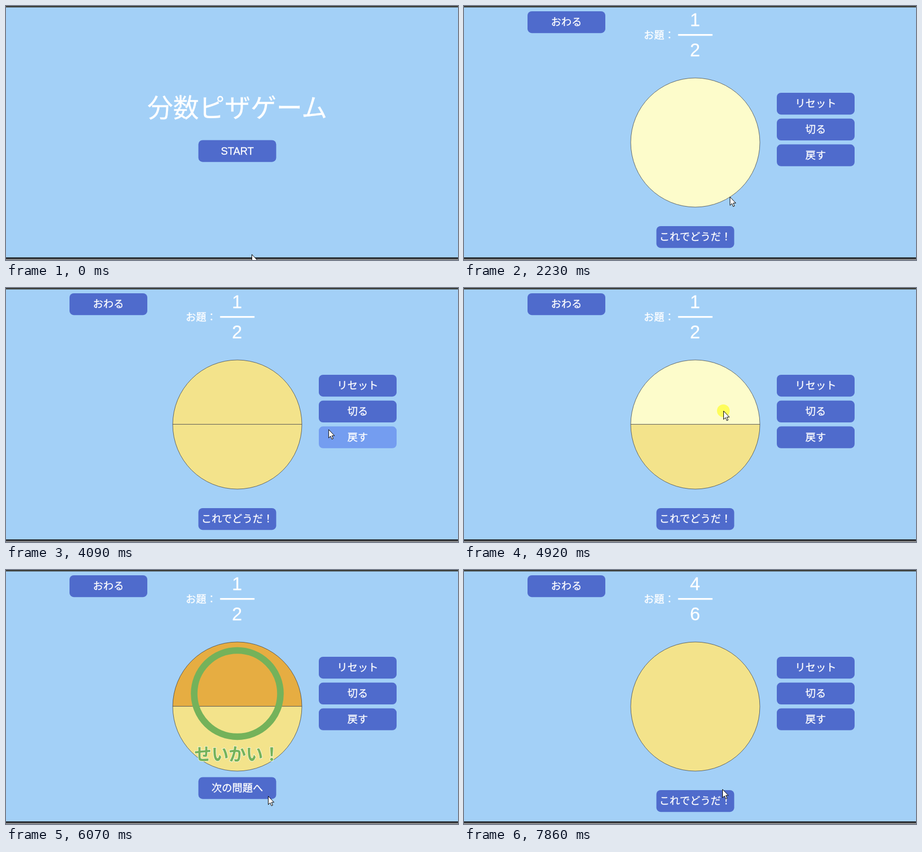
Write an HTML page that moves like this. It is 854 px wide and 480 px high and loops after 8000 ms.

```html
<!DOCTYPE html>
<html lang="ja">
<head>
<meta charset="utf-8">
<title>分数ピザゲーム</title>
<style>
html, body { margin: 0; width: 100%; height: 100%; overflow: hidden; background: #a3d0f7; }
svg { display: block; width: 854px; height: 480px; }
text { font-family: "Noto Sans CJK JP", "Noto Sans CJK", sans-serif; fill: #fff; stroke: #fff; stroke-width: .3px; text-anchor: middle; font-size: 19.5px; }
.latin { font-family: "Liberation Sans", Arial, sans-serif; }
.big { font-size: 48.8px; }
.num { font-size: 34.2px; }
.praise { font-size: 32.5px; font-weight: 700; fill: #74b25a; stroke: #f4f7dc; stroke-width: 2px; paint-order: stroke; }
</style>
</head>
<body>
<svg viewBox="0 0 854 480">
  <rect width="854" height="480" fill="#a3d0f7"/>
  <text id="title" class="big" x="437" y="210">分数ピザゲーム</text>
  <g id="game">
    <text x="368.8" y="61.5">お題：</text>
    <text id="top" class="latin num" x="436.5" y="38.3"></text>
    <rect x="404.5" y="53" width="65" height="3.3" fill="#fff"/>
    <text id="bottom" class="latin num" x="436.5" y="95.2"></text>
    <path id="upper" d="M315 258A122 122 0 0 1 559 258Z"/>
    <path id="lower" d="M315 258A122 122 0 0 0 559 258Z"/>
    <path id="seam" d="M315 257.6H559" stroke="#555"/>
    <circle cx="437" cy="258" r="122" fill="none" stroke="#333" stroke-width=".7"/>
  </g>
  <g id="result">
    <circle cx="437" cy="233.5" r="81.5" fill="none" stroke="#74b25a" stroke-width="12.5"/>
    <text class="praise" x="437" y="360">せいかい！</text>
  </g>
  <g id="buttons"></g>
  <rect width="854" height="2.6" fill="#3b3d38"/>
  <rect y="475" width="854" height="3" fill="#25292d"/>
  <rect y="478" width="854" height="2" fill="#8b8b8b"/>
  <g id="mouse">
    <circle id="press" r="12" fill="#fefd5c"/>
    <path d="M.5 .5V16.3L4.1 12.9L6.5 18.6L9 17.5L6.6 12H11.4Z" fill="#fff" stroke="#000"/>
  </g>
</svg>
<script>
const LOOP = 8000, LAG = 75, PRESS = 70;
const PLAY = 1710, CUT = 3700, PICK = 4990, RIGHT = 6010, NEXT = 7730;
const BASE = '#f3e38b', HOVER = '#fdfccb', PICKED = '#e6ad42';
const CX = 437, CY = 258, R = 122, W = 147, H = 41.2, STEP = 48.8;
const el = id => document.getElementById(id);
const lerp = (a, b, u) => a + (b - a) * u;

// each move curves toward `bend` and slows down by the power `ease`
const moves = [
  { from: 60, to: 1020, end: [440, 284], bend: [452, 350], ease: 2 },
  { from: 2090, to: 2900, end: [660, 302], bend: [532, 456], ease: 2 },
  { from: 2900, to: 3350, end: [658, 241], bend: [659, 271], ease: 2 },
  { from: 3700, to: 4780, end: [490, 232], bend: [600, 300], ease: 1 },
  { from: 5140, to: 5800, end: [495, 427], bend: [510, 330], ease: 2 },
  { from: 7210, to: 7860, end: [488, 414], bend: [492, 421], ease: 1 }
];
const clicks = [1420, 3490, 4920, 5870, 7340];

function pointer(t) {
  let p = [464, 469];
  for (const { from, to, end, bend, ease } of moves) {
    if (t < from) break;
    const u = 1 - (1 - Math.min(1, (t - from) / (to - from))) ** ease;
    p = p.map((v, i) => lerp(lerp(v, bend[i], u), lerp(bend[i], end[i], u), u));
  }
  return p;
}

const playing = t => t >= PLAY;
const showing = t => t >= RIGHT && t < NEXT;
const asking = t => playing(t) && !showing(t);

function add(tag, parent, attrs) {
  const node = document.createElementNS('http://www.w3.org/2000/svg', tag);
  for (const k in attrs) node.setAttribute(k, attrs[k]);
  return parent.appendChild(node);
}

function button(label, x, y, on, font = '') {
  const g = add('g', el('buttons'));
  const box = add('rect', g, { x, y, width: W, height: H, rx: 8 });
  add('text', g, { x: x + W / 2, y: y + 27.4, class: font }).textContent = label;
  return { g, box, x, y, on };
}

const mid = CX - W / 2;
const buttons = [
  button('START', mid, 253.5, t => !playing(t), 'latin'),
  button('おわる', 120, 10, playing),
  ...['リセット', '切る', '戻す'].map((s, i) => button(s, 591, 164 + i * STEP, playing)),
  button('これでどうだ！', mid, 416, asking),
  button('次の問題へ', mid, 391.5, showing)
];

function show(node, on) { node.style.display = on ? '' : 'none'; }

function draw(t) {
  const [x, y] = pointer(t);
  const [hx, hy] = pointer(t - LAG);
  // a new screen reacts only once the pointer moves
  const live = t < PLAY || (t >= 1900 && t < RIGHT) || (t >= 7270 && t < NEXT);

  for (const b of buttons) {
    const over = live && hx >= b.x && hx <= b.x + W && hy >= b.y && hy <= b.y + H;
    show(b.g, b.on(t));
    b.box.setAttribute('fill', over ? '#749df0' : '#4f6bcc');
  }

  const cut = t >= CUT && t < NEXT;
  const picked = t >= PICK && t < NEXT;
  const onPizza = live && !showing(t) && Math.hypot(hx - CX, hy - CY) < R;
  const tint = inHalf => onPizza && (!cut || inHalf) ? HOVER : BASE;
  el('upper').setAttribute('fill', picked ? PICKED : tint(hy < CY));
  el('lower').setAttribute('fill', tint(hy >= CY));
  show(el('seam'), cut);
  show(el('title'), !playing(t));
  show(el('game'), playing(t));
  show(el('result'), showing(t));
  el('top').textContent = t < NEXT ? 1 : 4;
  el('bottom').textContent = t < NEXT ? 2 : 6;

  el('mouse').setAttribute('transform', `translate(${x} ${y})`);
  show(el('press'), clicks.some(c => t >= c && t < c + PRESS));
}

const start = performance.now();
function tick(now) {
  draw(Math.max(0, now - start) % LOOP);
  requestAnimationFrame(tick);
}
draw(0);
requestAnimationFrame(tick);
</script>
</body>
</html>
```
